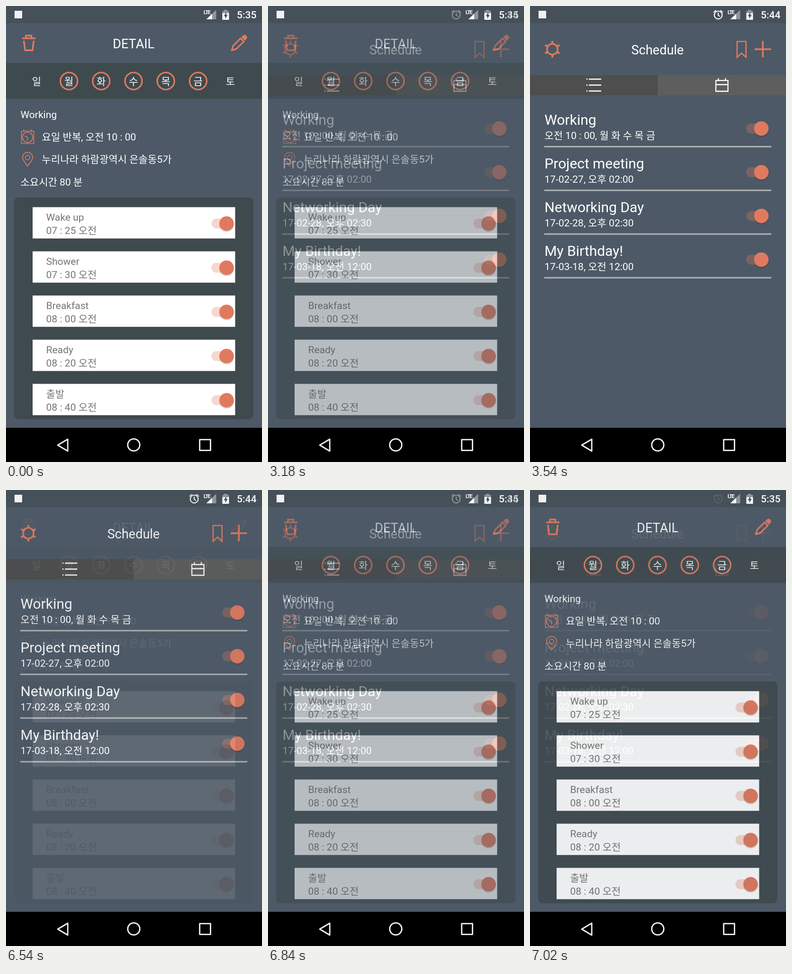
An HTML page for the animation above (7.08 s loop, 539x960 px).

```html
<!DOCTYPE html>
<html lang="ko">
<head>
<meta charset="utf-8">
<title>Schedule</title>
<style>
  html, body { margin: 0; width: 100%; height: 100%; overflow: hidden; background: #4d5966; }
  svg { display: block; width: 100%; height: 100%; }
  text { font-family: Roboto, "Noto Sans CJK KR", "Noto Sans CJK", sans-serif; }
</style>
</head>
<body>
<svg id="stage" viewBox="0 0 539 960"></svg>
<script>
const ORANGE = '#e07a5f', WHITE = '#fff', BODY = '#4d5966', DARK = '#3f4a4f';
const HOLD = 3000, STEP = 60, FADE_OUT = 540, LOOP = 7080;

const rect = (x, y, w, h, fill, extra = '') =>
  `<rect x="${x}" y="${y}" width="${w}" height="${h}" fill="${fill}" ${extra}/>`;
const disc = (x, y, r, fill, extra = '') =>
  `<circle cx="${x}" cy="${y}" r="${r}" fill="${fill}" ${extra}/>`;
const ring = (x, y, r, color, width) =>
  disc(x, y, r, 'none', `stroke="${color}" stroke-width="${width}"`);
const line = (d, color, width, extra = '') =>
  `<path d="${d}" fill="none" stroke="${color}" stroke-width="${width}" ${extra}/>`;
const shape = (d, fill) => `<path d="${d}" fill="${fill}"/>`;
const text = (x, y, str, size = 21, fill = WHITE, extra = '') =>
  `<text x="${x}" y="${y}" font-size="${size}" fill="${fill}" ${extra}>${str}</text>`;
const centered = (x, y, str, size) => text(x, y, str, size, WHITE, 'text-anchor="middle"');

const toggle = (x, y) =>
  rect(x - 32, y - 10.5, 38, 21, ORANGE, 'rx="10.5" opacity=".3"') +
  disc(x, y + 2, 15.5, '#000', 'opacity=".16"') +
  disc(x, y, 15.3, ORANGE);

function statusBar(time) {
  return rect(0, 0, 539, 36, '#455059') +
    rect(18, 10, 16, 16, '#f1f1f1') +
    shape('M442.5 8V28H422Z', '#8e969b') +
    shape('M434 16.3V28H422Z', WHITE) +
    text(416, 17, 'LTE', 11, WHITE, 'font-weight="700" letter-spacing="-1.4"') +
    shape('M455.5 15V10.5H459V8H465.5V10.5H469.5V15Z', '#8e969b') +
    rect(455.5, 15, 14, 14, WHITE) +
    shape('M464 13L458.5 21.5H461.6V27L467 18.8H464Z', '#455059') +
    text(486, 26, time, 21, WHITE, 'font-weight="500"');
}

function navBar() {
  return rect(0, 888, 539, 72, '#000') +
    line('M130 912V937L109 924.5Z', '#f2f2f2', 2.8, 'stroke-linejoin="round"') +
    ring(269, 924, 12.7, '#f2f2f2', 2.8) +
    line('M407.8 912.8H430.6V935.6H407.8Z', '#f2f2f2', 2.8, 'stroke-linejoin="round"');
}

function screen(time, content) {
  return rect(0, 0, 539, 960, BODY) + statusBar(time) + content + navBar();
}

function alarmCard([name, time], i) {
  const y = 423.5 + i * 93;
  return rect(55.5, y + .5, 427.5, 66.8, '#2c3437', 'opacity=".5"') +
    rect(56, y, 426.5, 66, WHITE) +
    text(84.5, y + 28.5, name, 21, '#757575') +
    text(84.5, y + 56.5, time + ' 오전', 21, '#757575') +
    toggle(464.5, y + 34.5);
}

function dayMark(name, i) {
  const x = 64.5 + i * 68;
  const workday = i > 0 && i < 6;
  return (workday ? ring(x, 158, 18, ORANGE, 3.2) : '') + centered(x, 165.5, name, 21);
}

function detail() {
  const trash =
    line('M34 68H62M42 67V62.3H53.5V67', ORANGE, 3.6) +
    line('M37.5 73L40.3 93.2H55.8L58.5 73', ORANGE, 3.5);
  const pencil =
    line('M475.3 93.3L478.3 83.6L494 68L500.7 74.8L485 90.4Z', ORANGE, 3.2, 'stroke-linejoin="round"') +
    shape('M495.5 65.5L499 62Q502.5 59 506 62.5Q509.3 66 506.3 69.3L503 73Z', ORANGE);
  const clock =
    line('M32.5 263.5H58.5V289.5H32.5ZM37.5 260V265M53.5 260V265', ORANGE, 1.6) +
    ring(45.5, 276.5, 10.8, ORANGE, 1.6) +
    line('M39.5 273.5L45.5 276.5V283.5', ORANGE, 1.7);
  const pin =
    line('M45.5 337C41 330 34.8 324.5 34.8 318.8A10.7 10.7 0 0 1 56.2 318.8C56.2 324.5 50 330 45.5 337Z', ORANGE, 1.7) +
    ring(45.5, 319, 4.8, ORANGE, 1.7);
  const alarms = [
    ['Wake up', '07 : 25'], ['Shower', '07 : 30'], ['Breakfast', '08 : 00'],
    ['Ready', '08 : 20'], ['출발', '08 : 40']
  ];
  return screen('5:35',
    trash + centered(268.7, 88.5, 'DETAIL', 27) + pencil +
    rect(0, 120, 539, 75.5, DARK) +
    [...'일월화수목금토'].map(dayMark).join('') +
    text(30.5, 236, 'Working') +
    clock + text(75.5, 282.8, '요일 반복, 오전 10 : 00') +
    pin + text(75.5, 330.3, '누리나라 하람광역시 은솔동5가') +
    text(30.5, 378.3, '소요시간 80 분') +
    rect(17, 403, 504, 467, DARK, 'rx="9"') +
    alarms.map(alarmCard).join(''));
}

function eventRow([name, when], i) {
  const y = i * 92;
  return text(30.5, y + 249.7, name, 29.9) +
    text(30.5, y + 280, when) +
    rect(30, y + 294.6, 478, 3, '#b2b5b6') +
    toggle(487, y + 258);
}

function schedule() {
  const alarm =
    ring(396.3, 19, 8.3, WHITE, 2.1) +
    line('M396.3 14V19.5L400 22M386.5 13.5L391.8 9M400.8 9L406 13.5', WHITE, 2);
  let gear = ring(47, 91, 11.3, ORANGE, 3.3);
  for (let a = 0; a < 360; a += 60)
    gear += line('M47 79.5V73.5', ORANGE, 3.8, `transform="rotate(${a} 47 91)"`);
  const bookmark = line('M436 74.8H454.8V108L445.4 99.3L436 108Z', ORANGE, 2.6);
  const plus = line('M473 91H507.5M490.2 73.8V108.2', ORANGE, 3.5);
  const list = line('M124 154H150M124 166.5H150M124 179H150', WHITE, 2.4) +
    [154, 166.5, 179].map(y => disc(120, y, 1.4, WHITE)).join('');
  const calendar = line('M391.3 156.8H416.8V179.5H391.3ZM391.3 165.5H416.8M396.5 152V157M411.5 152V157', WHITE, 2.3);
  const events = [
    ['Working', '오전 10 : 00, 월 화 수 목 금'],
    ['Project meeting', '17-02-27, 오후 02:00'],
    ['Networking Day', '17-02-28, 오후 02:30'],
    ['My Birthday!', '17-03-18, 오전 12:00']
  ];
  return screen('5:44',
    alarm + gear + centered(268.5, 101.5, 'Schedule', 27) + bookmark + plus +
    rect(0, 145.5, 269, 42.5, '#4e4e4e') + rect(269, 145.5, 270, 42.5, '#5e5e5e') +
    list + calendar + events.map(eventRow).join(''));
}

const stage = document.getElementById('stage');
stage.innerHTML = `<g>${detail()}</g><g id="top">${schedule()}</g>`;
const topScreen = document.getElementById('top');

// The cross-fade advances by a tenth every 60 ms.
const fade = since => Math.min(1, Math.max(0, (Math.floor(since / STEP) + 1) / 10));

function draw(t) {
  topScreen.setAttribute('opacity', fade(t - HOLD) - fade(t - 2 * HOLD - FADE_OUT));
}

const start = performance.now();
function tick() {
  draw((performance.now() - start) % LOOP);
  requestAnimationFrame(tick);
}
tick();
</script>
</body>
</html>
```
